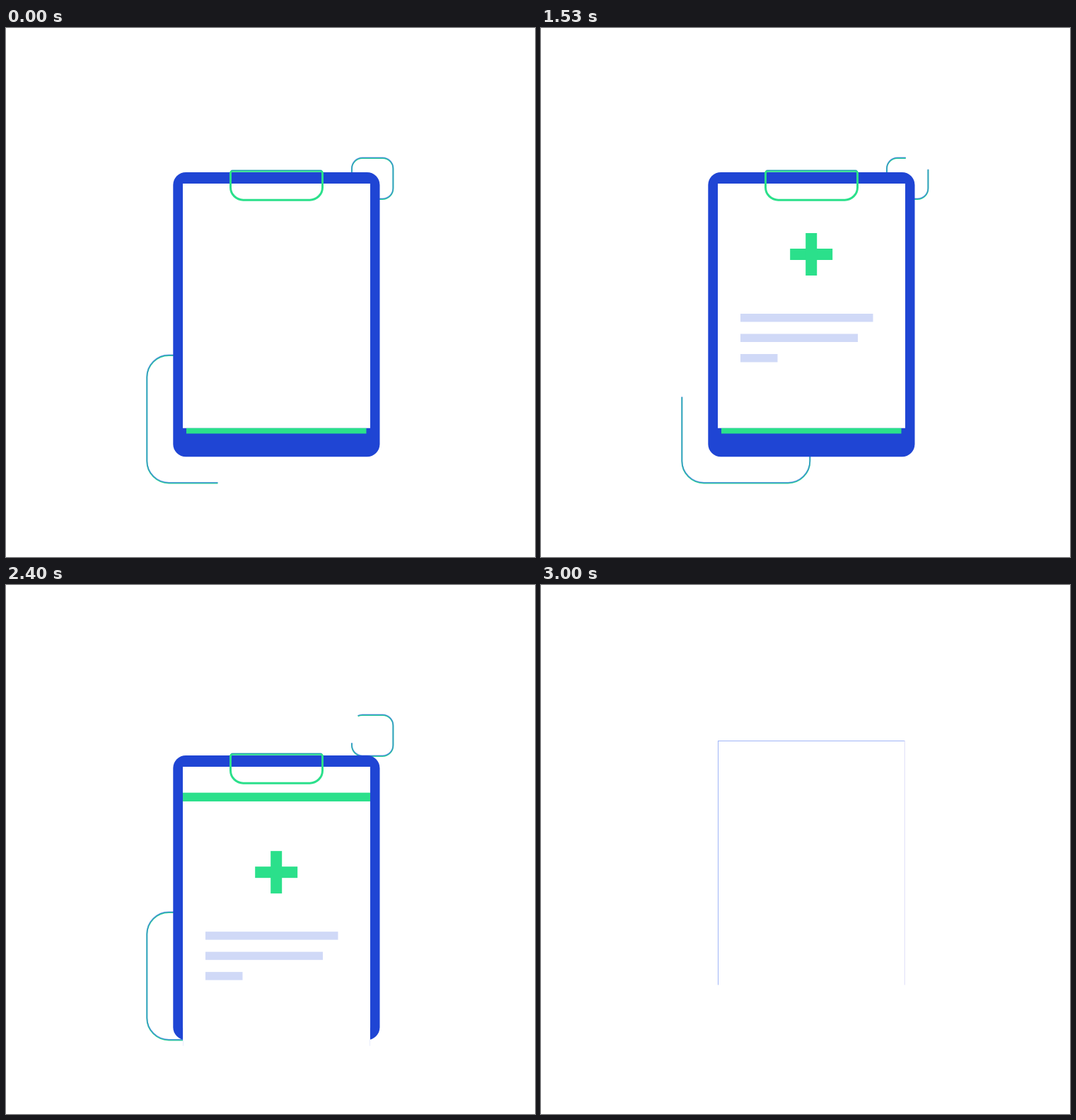
Animation, 748 px wide and 748 px high, one loop 3.03 s. Source, as an HTML page with a canvas:

```html
<!DOCTYPE html>
<html lang="en">
<head>
<meta charset="utf-8">
<title>Clipboard</title>
<style>
  html, body { margin: 0; width: 100%; height: 100%; overflow: hidden; background: #fff; }
  canvas { display: block; width: 748px; height: 748px; }
</style>
</head>
<body>
<canvas id="stage" width="748" height="748"></canvas>
<script>
const ctx = document.getElementById('stage').getContext('2d');
const BLUE = '#1f45d4', GREEN = '#2be08b', PALE = '#d0d9f7';
const LOOP = 3030, TICK = 100 / 3, LAST = 90;

// Paper geometry at rest
const paper = { x: 250, y: 220, w: 265, h: 345.5 };

// Rounded squares; start is the leading end of the gap as a share of the outline
const bigLoop = { x0: 199.3, y0: 462.5, x1: 380.3, y1: 643, r: 31, start: 0.147, clockwise: true };
const smallLoop = { x0: 489, y0: 183.5, x1: 547.4, y1: 241.5, r: 15, start: -0.1825, clockwise: false };

const smooth = (n, from, to) => {
  const u = Math.min(1, Math.max(0, (n - from) / (to - from)));
  return u * u * (3 - 2 * u);
};
const easeOut = (n, from, to) => {
  const u = Math.min(1, Math.max(0, (n - from) / (to - from)));
  return 1 - Math.pow(1 - u, 3);
};

function box(color, x, y, w, h) {
  ctx.fillStyle = color;
  ctx.fillRect(x, y, w, h);
}

function loopPath({ x0, y0, x1, y1, r, clockwise }, dy) {
  const corners = [[x1, y1], [x0, y1], [x0, y0], [x1, y0]];
  if (!clockwise) corners.reverse();
  ctx.beginPath();
  ctx.moveTo(x1, y1 - r + dy);
  corners.forEach(([x, y], i) => {
    const next = i < 3 ? corners[i + 1] : [x1, y1 - r];
    ctx.arcTo(x, y + dy, next[0], next[1] + dy, r);
  });
  ctx.closePath();
}

function drawLoop(loop, n) {
  const { x0, y0, x1, y1, r } = loop;
  const length = 2 * (x1 - x0 + y1 - y0 - 4 * r) + 2 * Math.PI * r;
  const lead = ((loop.start + n / LAST + 1) % 1) * length;
  ctx.save();
  ctx.setLineDash([0.8 * length, 0.2 * length]);
  ctx.lineDashOffset = -lead;
  const pass = (color, width, dy) => {
    ctx.strokeStyle = color;
    ctx.lineWidth = width;
    loopPath(loop, dy);
    ctx.stroke();
  };
  pass(GREEN, 1.9, 0.5);
  pass('rgba(58,112,232,0.62)', 1.7, -0.2);
  ctx.restore();
}

function boardShift(n) {
  if (n < 72) return 37 * smooth(n, 62.3, 72);
  if (n < 78) return 37 - 46 * smooth(n, 72, 78);
  return -9 + 9 * smooth(n, 78, 84);
}

function drawBoard() {
  ctx.fillStyle = BLUE;
  ctx.beginPath();
  ctx.roundRect(236.3, 204, 292.2, 402.3, 18);
  ctx.fill();
  box('#fff', paper.x, paper.y, paper.w, paper.h);
  box(GREEN, 255, 565.5, 254.5, 8);
}

function drawClip() {
  ctx.strokeStyle = GREEN;
  ctx.lineWidth = 3;
  ctx.beginPath();
  ctx.roundRect(317.5, 202.3, 130, 40.9, [3, 3, 18, 18]);
  ctx.stroke();
  box('rgba(40,110,215,0.6)', 318.5, 200.7, 128, 1.2);
}

function drawContent(n) {
  const s = easeOut(n, 3, 14);
  if (s > 0) {
    box(GREEN, 382.2 - 30 * s, 320 - 8 * s, 60 * s, 16 * s);
    box(GREEN, 382.2 - 8 * s, 320 - 30 * s, 16 * s, 60 * s);
  }
  [187.5, 166, 52.5].forEach((w, i) => {
    box(PALE, 282, 404 + 28.5 * i, w * easeOut(n, 8 + 4 * i, 18 + 4 * i), 11.5);
  });
}

// Top sheet: slides out over the bottom of the board and fades
function drawSheet(n, shift) {
  const alpha = 1 - smooth(n, 72, 78.7);
  if (alpha <= 0) return;
  const drop = 280 * smooth(n, 61.6, 89.8);
  ctx.save();
  ctx.globalAlpha = alpha;
  ctx.beginPath();
  ctx.rect(0, paper.y + shift, 748, 748);
  ctx.clip();
  ctx.translate(0, drop);
  box(GREEN, paper.x, paper.y - 12.5, paper.w, 12.5);
  box('#fff', paper.x, paper.y, paper.w, paper.h);
  if (drop > 37) {
    box('#e3e8fb', paper.x, 540, 0.8, 25.5);
    box('#e3e8fb', paper.x + 264, 540, 0.8, 25.5);
  }
  drawContent(n);
  ctx.restore();
}

function drawOutline() {
  box('#9fb5f7', 250, 220, 264.5, 1);
  box('#9fb5f7', 250, 220, 1, 345.5);
  box('#dcdcf7', 513.7, 220, 1, 345.5);
}

function draw(n) {
  box('#fff', 0, 0, 748, 748);
  if (n >= LAST) return drawOutline();
  const shift = boardShift(n);
  drawLoop(bigLoop, n);
  drawLoop(smallLoop, n);
  ctx.save();
  ctx.translate(0, shift);
  drawBoard();
  ctx.restore();
  drawSheet(n, shift);
  ctx.save();
  ctx.translate(0, shift);
  drawClip();
  ctx.restore();
}

const begin = performance.now();
function tick() {
  const t = (performance.now() - begin) % LOOP;
  draw(Math.min(LAST, Math.floor((t + 3.4) / TICK)));
  requestAnimationFrame(tick);
}
tick();
</script>
</body>
</html>
```
